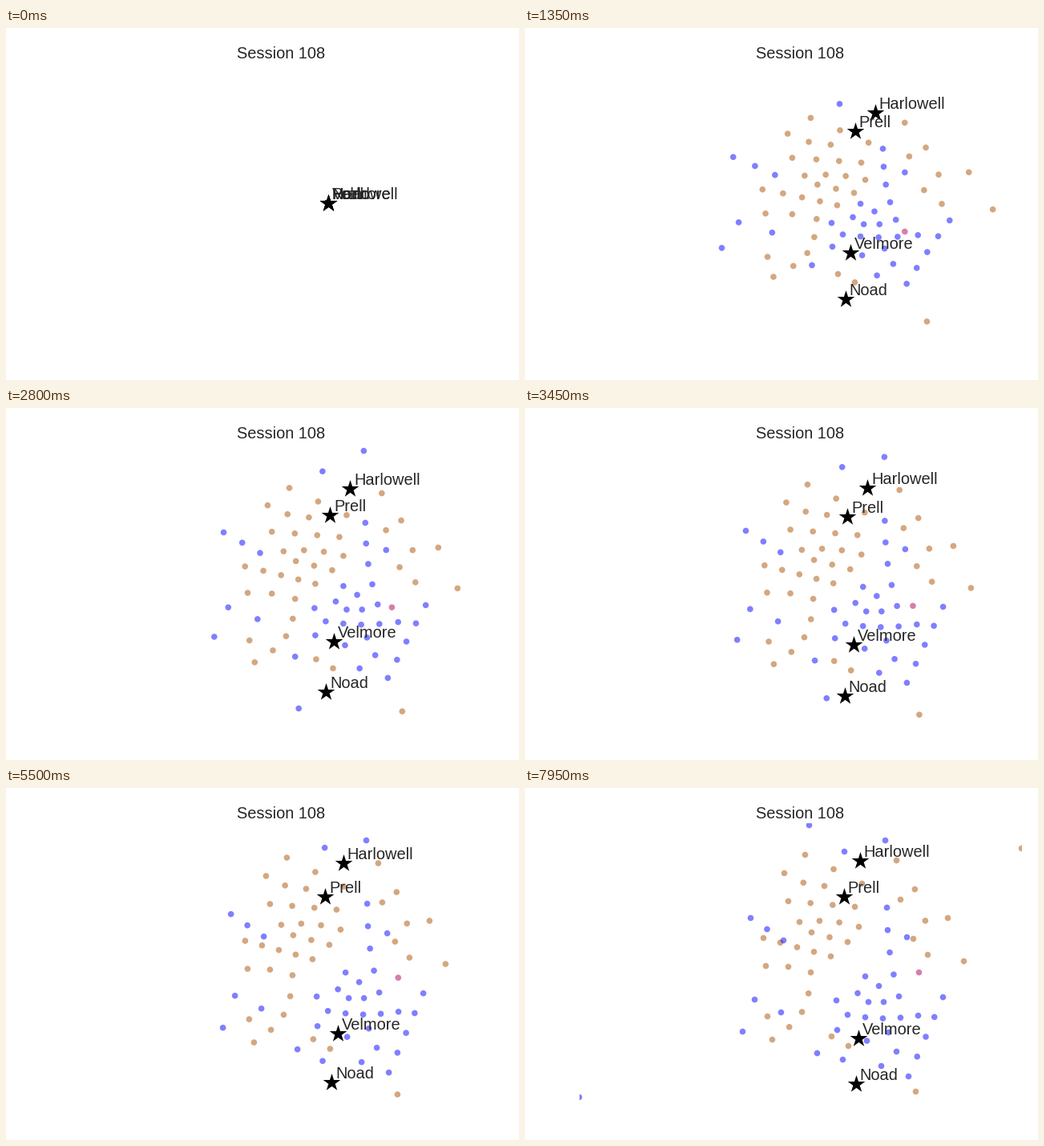
A matplotlib script for the animation above (8000 ms loop, 640 by 440 pixels).

```python
import numpy as np
import matplotlib.pyplot as plt
from matplotlib.animation import FuncAnimation
from matplotlib.patches import Rectangle

plt.rcParams["font.family"] = "Liberation Sans"

W, H, DPI = 640, 440, 100
STEP, FRAMES = 50, 160
CENTER = np.array([401.0, 218.0])
SPREAD, SETTLE, END = 1350, 4550, 7950   # times of the three layouts, ms
INK, BLUE, TAN, PINK = "#262626", "#0000ff", "#aa5000", "#aa0055"


def row(n, start, end, bend=0):
    """n evenly spaced dots from start to end, bowed sideways by bend."""
    a, b = np.array(start, float), np.array(end, float)
    u = np.linspace(0, 1, n)[:, None]
    dx, dy = b - a
    normal = np.array([dy, -dx]) / np.hypot(dx, dy)
    return a + (b - a) * u + normal * bend * np.sin(np.pi * u)


# Settled layout of each party
tan = np.vstack([
    row(3, (351, 91), (422, 127)),
    row(3, (325, 114), (375, 130), -4),
    row(4, (330, 149), (413, 156)),
    row(4, (344, 175), (418, 181), 4),
    row(3, (359, 188), (404, 200)),
    row(5, (299, 195), (383, 218)),
    row(2, (302, 230), (330, 231)),
    row(5, (358, 238), (310, 322), 15),
    row(2, (384, 318), (405, 330)),
    row(4, (465, 98), (504, 216), 12),
    row(2, (470, 147), (486, 196)),
    row(2, (529, 170), (549, 224)),
    row(2, (304, 293), (489, 387)),
])
blue = np.vstack([
    row(3, (279, 151), (320, 179)),
    row(5, (449, 138), (464, 249), -4),
    row(5, (519, 250), (476, 349)),
    row(3, (386, 254), (439, 236)),
    row(2, (426, 256), (445, 256)),
    row(5, (400, 272), (488, 273), -4),
    row(3, (387, 291), (461, 318)),
    row(2, (451, 294), (442, 336)),
    row(2, (317, 269), (269, 293)),
    row(2, (396, 68), (362, 320)),
    row(2, (474, 175), (422, 224)),
    row(1, (284, 253), (269, 293)),
])
pink = np.array([[486.0, 245.0]])

# Per party: settled dots, color, early shift in x, row that keeps its
# height while the layout stretches, stretch rate, late drift
PARTIES = [
    (tan, TAN, 6, 240, 0.14, (-2, -8)),
    (blue, BLUE, -4, 200, 0.20, (2, 11)),
    (pink, PINK, -18, 200, -0.20, (5, -15)),
]

# Dots that slide in from outside: color, start, end, t0, t1
GUESTS = [
    (BLUE, (437, 20), (449, 65), SPREAD, SETTLE),
    (BLUE, (330, 415), (396, 339), SPREAD, 6400),
    (BLUE, (354, 20), (354, 46), SETTLE, END),
    (BLUE, (20, 386), (67, 386), SETTLE, END),
    (TAN, (670, 75), (619, 75), SETTLE, END),
]

# Leaders: label and place in each of the three layouts
LEADERS = [
    ("Harlowell", (436, 105), (424, 98), (417, 90)),
    ("Prell", (411, 128), (399, 137), (397, 135)),
    ("Velmore", (405, 280), (411, 300), (415, 312)),
    ("Noad", (399, 338), (398, 365), (412, 369)),
]


def party_layouts(dots, shift, pivot, rate, drift):
    x, y = dots.T
    edge = 15 * ((x - CENTER[0]) / 120) ** 3
    spread = np.column_stack([x + shift + edge, y + (pivot - y) * rate])
    return spread, dots, dots + np.array(drift)


parts = [party_layouts(dots, *rule) for dots, _, *rule in PARTIES]
dot_layouts = [np.vstack(layer) for layer in zip(*parts)]
star_layouts = [np.array(layer, float)
                for layer in zip(*(places for _, *places in LEADERS))]
colors = [color for dots, color, *_ in PARTIES for _ in dots]
colors += [guest[0] for guest in GUESTS]


def ease(t, t0, t1, power):
    u = np.clip((t - t0) / (t1 - t0), 0, 1)
    return 1 - (1 - u) ** power


def burst(t):
    """Growth from the center: fast, a slight overshoot, then 1."""
    u = np.clip((t - 50) / (SPREAD - 50), 0, 1)
    return 1 - np.exp(-4.5 * u) * np.cos(1.5 * np.pi * u)


def place(layouts, t):
    spread, settle, end = layouts
    if t <= SPREAD:
        return CENTER + (spread - CENTER) * burst(t)
    if t <= SETTLE:
        return spread + (settle - spread) * ease(t, SPREAD, SETTLE, 1.5)
    return settle + (end - settle) * ease(t, SETTLE, END, 2.5)


def guest_places(t):
    return np.array([np.array(a) + np.subtract(b, a) * ease(t, t0, t1, 2.2)
                     for _, a, b, t0, t1 in GUESTS])


fig = plt.figure(figsize=(W / DPI, H / DPI), dpi=DPI, facecolor="white")
ax = fig.add_axes([0, 0, 1, 1])
ax.set_xlim(-0.5, W - 0.5)
ax.set_ylim(H - 0.5, -0.5)
ax.axis("off")

ax.text(343, 37, "Session 108", size=14.4, color=INK, ha="center",
        va="baseline")
start = np.tile(CENTER, (len(colors), 1))
dots = ax.scatter(*start.T, s=30, c=colors, alpha=0.5, linewidths=0, zorder=2)
dots.set_clip_path(Rectangle((67, 43), 552, 354, transform=ax.transData))
stars = ax.scatter(*start[:len(LEADERS)].T, s=270, c="black", marker="*",
                   linewidths=0, zorder=3)
labels = [ax.text(0, 0, name, size=14.4, color=INK, va="baseline", zorder=4)
          for name, *_ in LEADERS]


def update(i):
    t = i * STEP
    dots.set_offsets(np.vstack([place(dot_layouts, t), guest_places(t)]))
    places = place(star_layouts, t)
    stars.set_offsets(places)
    for label, (x, y) in zip(labels, places):
        label.set_position((x + 5, y - 5))
    return [dots, stars, *labels]


anim = FuncAnimation(fig, update, frames=FRAMES, interval=STEP, repeat=True,
                     repeat_delay=0, blit=False)
plt.show()
```
